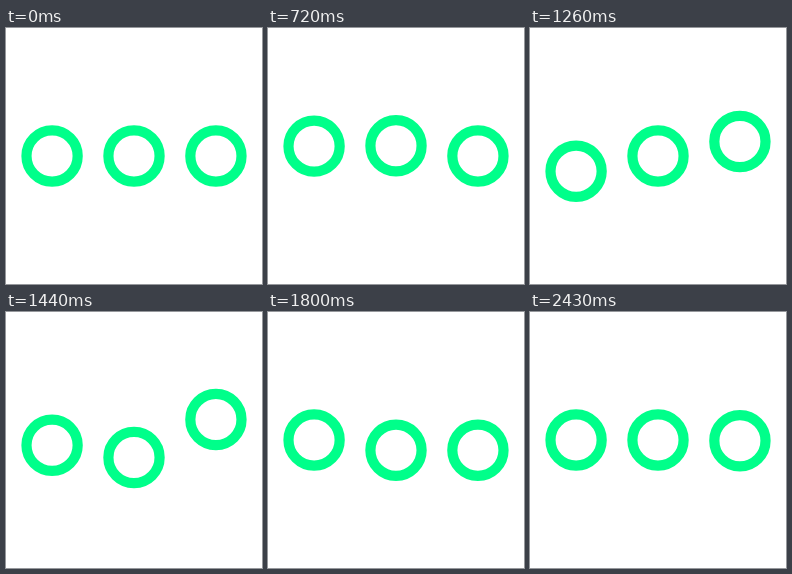
Write an HTML page with a canvas that moves like this. It is 256x256 px and loops after 2.52 s.

```html
<!DOCTYPE html>
<html lang="en">
<head>
<meta charset="utf-8">
<title>Three bouncing rings</title>
<style>
  html, body { margin: 0; width: 100%; height: 100%; overflow: hidden; background: #fff; }
  canvas { display: block; width: 256px; height: 256px; }
</style>
</head>
<body>
<canvas id="stage" width="256" height="256"></canvas>
<script>
const ctx = document.getElementById("stage").getContext("2d");
const LOOP = 2520;
const STEP = 90;
const REST_Y = 128;
const SWING = 20.48;

// Key times, in steps: leave rest, highest point, lowest point, back at rest.
const rings = [
  { x: 46.08, keys: [0, 6, 12, 18] },
  { x: 128, keys: [5, 11, 17, 23] },
  { x: 209.92, keys: [10.3, 16.05, 21.9, 27.7] }
];
const heights = [0, -SWING, SWING, 0];

const ease = u => u * u * (3 - 2 * u);

function offsetAt(keys, step) {
  for (let i = 0; i < 3; i++) {
    if (step >= keys[i] && step < keys[i + 1]) {
      const u = (step - keys[i]) / (keys[i + 1] - keys[i]);
      return heights[i] + (heights[i + 1] - heights[i]) * ease(u);
    }
  }
  return 0;
}

function draw(ms) {
  const step = Math.floor((ms % LOOP) / STEP);
  ctx.fillStyle = "#fff";
  ctx.fillRect(0, 0, 256, 256);
  ctx.strokeStyle = "#00ff8a";
  ctx.lineWidth = 10.24;
  for (const { x, keys } of rings) {
    ctx.beginPath();
    ctx.arc(x, REST_Y + offsetAt(keys, step), 25.6, 0, Math.PI * 2);
    ctx.stroke();
  }
}

const start = performance.now();
function tick() {
  draw(performance.now() - start);
  requestAnimationFrame(tick);
}
tick();
</script>
</body>
</html>
```
